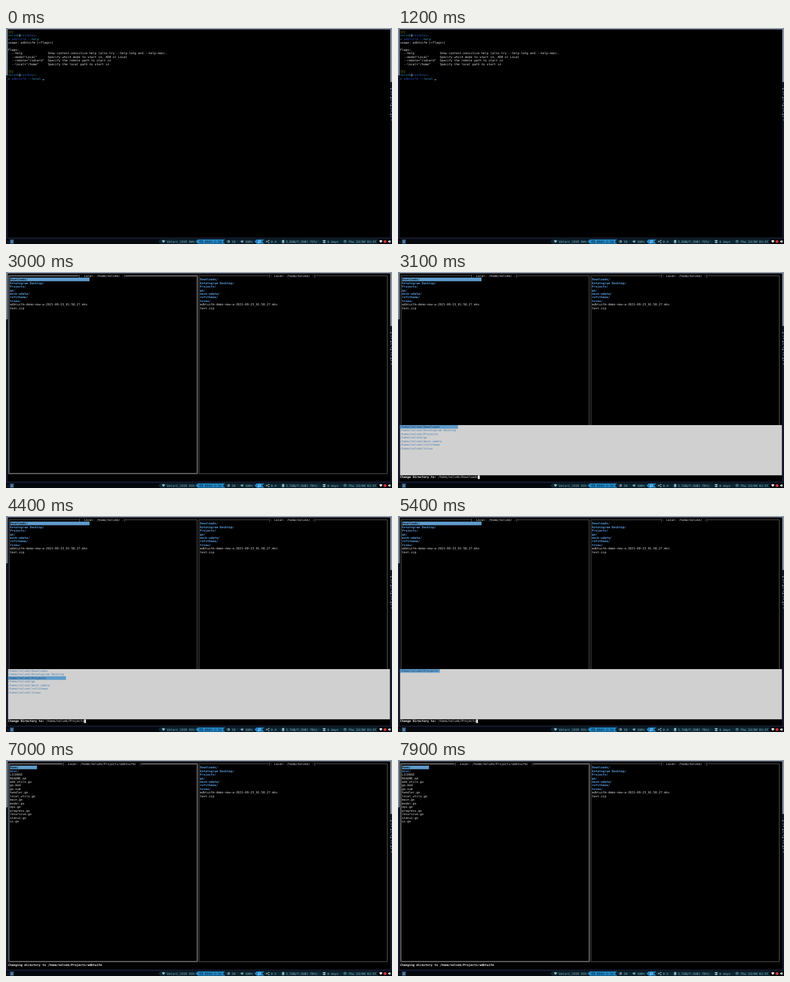
An HTML page that plays this animation: 690x388 px, repeating every 8000 ms.

```html
<!DOCTYPE html>
<html lang="en">
<head>
<meta charset="utf-8">
<title>Terminal file manager</title>
<style>
  html, body { margin: 0; width: 100%; height: 100%; overflow: hidden; background: #000; }
  svg { display: block; width: 100vw; height: 100vh; }
  text {
    font: 5.373px "DejaVu Sans Mono", monospace;
    white-space: pre;
    text-rendering: geometricPrecision;
  }
  .b { font-weight: bold; }
  .bar { font-size: 5.5px; }
</style>
</head>
<body>
<svg id="stage" viewBox="0 0 690 388" preserveAspectRatio="none">
  <g id="desk"></g>
  <rect x="3.3" y="2.6" width="683.4" height="373.6" fill="#000"/>
  <g id="screen"></g>
  <g id="bar"></g>
</svg>
<script>
const LOOP = 8000, CW = 3.235, RH = 6.46, X0 = 3.7, Y0 = 6.9;
const HOME = "/home/nolvek/", PROJ = HOME + "Projects";
const WHITE = "#dcdcdc", BLUE = "#5b9bdc", PICK = "#5f9bcb", GREY = "#d0d0d0";
const $ = id => document.getElementById(id);

const homeList = ["Downloads/", "Kotatogram Desktop/", "Projects/", "go/", "mock-udata/",
  "rofitheme/", "tview/", "adbtuifm-demo-new-a-2021-09-23_01.58.27.mkv", "test.zip"];
const repoList = ["Demo/", "dist/", "LICENSE", "README.md", "adb_utils.go", "go.mod", "go.sum",
  "handler.go", "local_utils.go", "main.go", "modal.go", "ops.go", "progress.go",
  "recursive.go", "status.go", "ui.go"];
const homeDirs = homeList.filter(n => n.endsWith("/")).map(n => HOME + n.slice(0, -1));
const projDirs = ["adbtuifm", "goreportcard", "test"].map(n => PROJ + "/" + n);

const steps = [
  { at: 0, cmd: "" },
  { at: 1500, cmd: "~" },
  { at: 1700, app: homeList, path: HOME },
  { at: 3100, items: homeDirs, pick: 0, input: homeDirs[0] },
  { at: 3500, pick: 1, input: homeDirs[1] },
  { at: 4400, pick: 2, input: PROJ },
  { at: 5300, items: [PROJ], pick: 0 },
  { at: 6000, input: PROJ + "/" },
  { at: 6400, items: projDirs, input: projDirs[0] },
  { at: 7000, app: repoList, path: projDirs[0] + "/", items: null,
    note: "Changing directory to " + projDirs[0] }
];

const esc = s => s.replace(/&/g, "&amp;").replace(/</g, "&lt;");
const colX = c => X0 + c * CW;
const rowY = r => Y0 + r * RH;
const rect = (x, y, w, h, fill) =>
  `<rect x="${x}" y="${y}" width="${w}" height="${h}" fill="${fill}"/>`;
const cells = (c, r, w, h, fill) =>
  rect(colX(c), rowY(r) - RH / 2, w * CW, h * RH, fill);
const text = (c, r, s, fill = WHITE, cls = "") =>
  `<text x="${colX(c)}" y="${rowY(r) + 1.8}" fill="${fill}" class="${cls}">${esc(s)}</text>`;
const longest = list => Math.max(...list.map(s => s.length));

// Coloured runs on one row: [text, colour, text, colour, ...]
function runs(r, parts) {
  let c = 0, out = "";
  for (let i = 0; i < parts.length; i += 2) {
    out += text(c, r, parts[i], parts[i + 1]);
    c += parts[i].length;
  }
  return out;
}

function prompt(r, arg) {
  return runs(r, ["[", "#a9a63c", "I", "#5fae3c", "]", "#a9a63c"]) +
    runs(r + 1, ["nolvek", "#2b87ad", "@", WHITE, "rainbow", "#2a58b0", ":", WHITE, "~", "#3f9fc8"]) +
    runs(r + 2, ["» ", "#9aa7c8", "adbtuifm ", "#2a49bc", arg, "#3d98c4"]);
}

function shell(s) {
  const help = ["usage: adbtuifm [<flags>]", "", "Flags:",
    "  --help              Show context-sensitive help (also try --help-long and --help-man).",
    '  --mode="Local"      Specify which mode to start in, ADB or Local',
    '  --remote="/sdcard"  Specify the remote path to start in',
    '  --local="/home"     Specify the local path to start in'];
  const cursor = 19 + s.cmd.length;
  return prompt(0, "--help") + help.map((l, i) => text(0, 3 + i, l)).join("") +
    prompt(11, "--local " + s.cmd) +
    rect(colX(cursor), rowY(13) + 1.5, CW, 1, "#a9c4e4");
}

function pane(c, list, path, focus) {
  const x = colX(c + .5), y = rowY(0), w = 104 * CW, h = 55 * RH;
  const box = (d, col) => `<rect x="${x + d}" y="${y + d}" width="${w - 2 * d}" height="${h - 2 * d}"
    fill="none" stroke="${col}" stroke-width=".6"/>`;
  const title = `[- Local: ${path} -]`;
  const tc = c + Math.floor((105 - title.length) / 2);
  let out = focus ? box(-.6, "#b4b4b4") + box(.6, "#b4b4b4") : box(0, "#9c9c9c");
  out += cells(tc, 0, title.length, 1, "#000") + text(tc, 0, title);
  if (c === 0) out += cells(1, 1, longest(list) + 1, 1, PICK);
  list.forEach((n, i) => {
    const dir = n.endsWith("/"), picked = c === 0 && i === 0;
    out += text(c + 1, i + 1, n, picked ? "#0b1c2c" : dir ? BLUE : WHITE, dir ? "b" : "");
  });
  return out;
}

function dialog(s) {
  let out = cells(0, 42, 211, 14, GREY) + cells(0, 56, 211, 1, "#000");
  out += cells(0, 42 + s.pick, longest(s.items) + 1, 1, PICK);
  s.items.forEach((n, i) => {
    out += text(0, 42 + i, n, i === s.pick ? "#20405c" : "#527fae");
  });
  return out + text(0, 56, "Change Directory to:", "#f4f4f4", "b") +
    text(21, 56, s.input) + cells(21 + s.input.length, 56, 1, 1, "#f0f0f0");
}

function screen(s) {
  if (!s.app) return shell(s);
  return pane(0, s.app, s.path, !s.items) + pane(105, homeList, HOME, false) +
    (s.items ? dialog(s) : "") + (s.note ? text(0, 56, s.note, "#ececec", "b") : "");
}

function bar(started, load) {
  const mid = 383.6, dark = "#0c2631", pale = "#8fb6c4", lit = "#2186c4", ink = "#062032";
  const seg = (a, b, fill) =>
    `<path d="M${a} ${mid}l4 -3.8H${b + 4}l-4 3.8 4 3.8H${a + 4}z" fill="${fill}"/>`;
  const label = (x, s, fill = pale) => `<text class="bar" x="${x}" y="${mid + 1.9}" fill="${fill}">${s}</text>`;
  const line = (d, col = pale) => `<path d="${d}" fill="none" stroke="${col}" stroke-width=".8"/>`;
  const shape = (d, col = pale) => `<path d="${d}" fill="${col}"/>`;
  const ring = x => `<circle cx="${x}" cy="${mid}" r="2.1" fill="none" stroke="${pale}" stroke-width=".7"/>`;
  const wifi = (x, col) => shape(`M${x} 386l-3 -3.6q3 -2.6 6 0z`, col);
  const speaker = (x, col) => shape(`M${x - 2.5} 382.5h1.5l2 -1.7v5.4l-2 -1.7h-1.5z`, col) +
    line(`M${x + 1.4} 381.7q1.6 1.8 0 3.6`, col);
  return rect(0, 379, 690, 9, "#05090e") +
    label(2, "1", "#557") + rect(7, 380, 7, 7.5, "#2c587d") + label(8.8, "2", "#e4eef6") +
    seg(272, 339, dark) + seg(339, 388, lit) + seg(388, 443, dark) +
    seg(444, 458, lit) + seg(458, 488, dark) + seg(488, 560, "#0e2b37") +
    seg(560, 599, dark) + seg(599, 662, "#0e2b37") +
    wifi(281.5, pale) + label(287.5, "Velori_2335 " + (started ? "91%" : "94%")) +
    line("M346.5 382h5v3h-5z", ink) + label(355.5, "#94% " + (started ? "1:32" : "1:38"), ink) +
    ring(397.5) + shape("M397.5 381.5a2.1 2.1 0 0 1 0 4.2z") + label(403.5, "28") +
    speaker(422, pale) + label(427.5, "100%") +
    line("M451.5 386v-4l3 -.7v4.2", "#a7d4ee") + shape("M450 385h1.9v1.4h-1.9zM453 384.5h1.9v1.4h-1.9z", "#a7d4ee") +
    line("M470 381.5l-4.5 2.1 4.5 2.1") + shape("M469 380.7h1.8v1.8h-1.8zM469 384.8h1.8v1.8h-1.8zM464.5 382.7h1.8v1.8h-1.8z") +
    label(473.5, load) +
    shape("M493.5 380.8h3.8v5.6h-3.8z") +
    label(500.5, started ? "1.7GB/7.2GB( 76%)" : "2.0GB/7.2GB( 72%)") +
    shape("M566.5 381h4.6v2h-4.6zM566.5 383.7h4.6v2.5h-4.6z") + label(574.5, "6 days") +
    ring(606) + line("M606 382v1.7h1.2") + label(612.5, "Thu 23/09 01:57") +
    wifi(670, "#e8e8e8") + `<circle cx="677.5" cy="${mid}" r="2.7" fill="#d2303c"/>` +
    speaker(685.5, "#e8e8e8");
}

// Wallpaper showing around the terminal window
function desk() {
  const specks = Array.from({ length: 12 }, (_, i) =>
    rect(687.2 + (i * 7 % 3) * .6, 108 + i * 5 + (i * i % 4), 1.6, 2.2, i % 3 ? "#56708c" : "#a3b2c4"));
  return rect(0, 0, 690, 388, "#121a2b") + rect(0, 0, 690, 2.6, "#9aa2b2") +
    rect(0, 0, 3.3, 85, "#7b8496") + rect(686.7, 0, 3.3, 97, "#8790a2") + specks.join("");
}

let shown = "";
function render(t) {
  const past = steps.filter(s => s.at <= t);
  const load = t < 6000 ? "0.4" : "0.5";
  const key = past.length + load;
  if (key === shown) return;
  shown = key;
  const state = Object.assign({}, ...past);
  $("screen").innerHTML = screen(state);
  $("bar").innerHTML = bar(!!state.app, load);
}

$("desk").innerHTML = desk();
const start = performance.now();
function tick() {
  render((performance.now() - start) % LOOP);
  requestAnimationFrame(tick);
}
tick();
</script>
</body>
</html>
```
